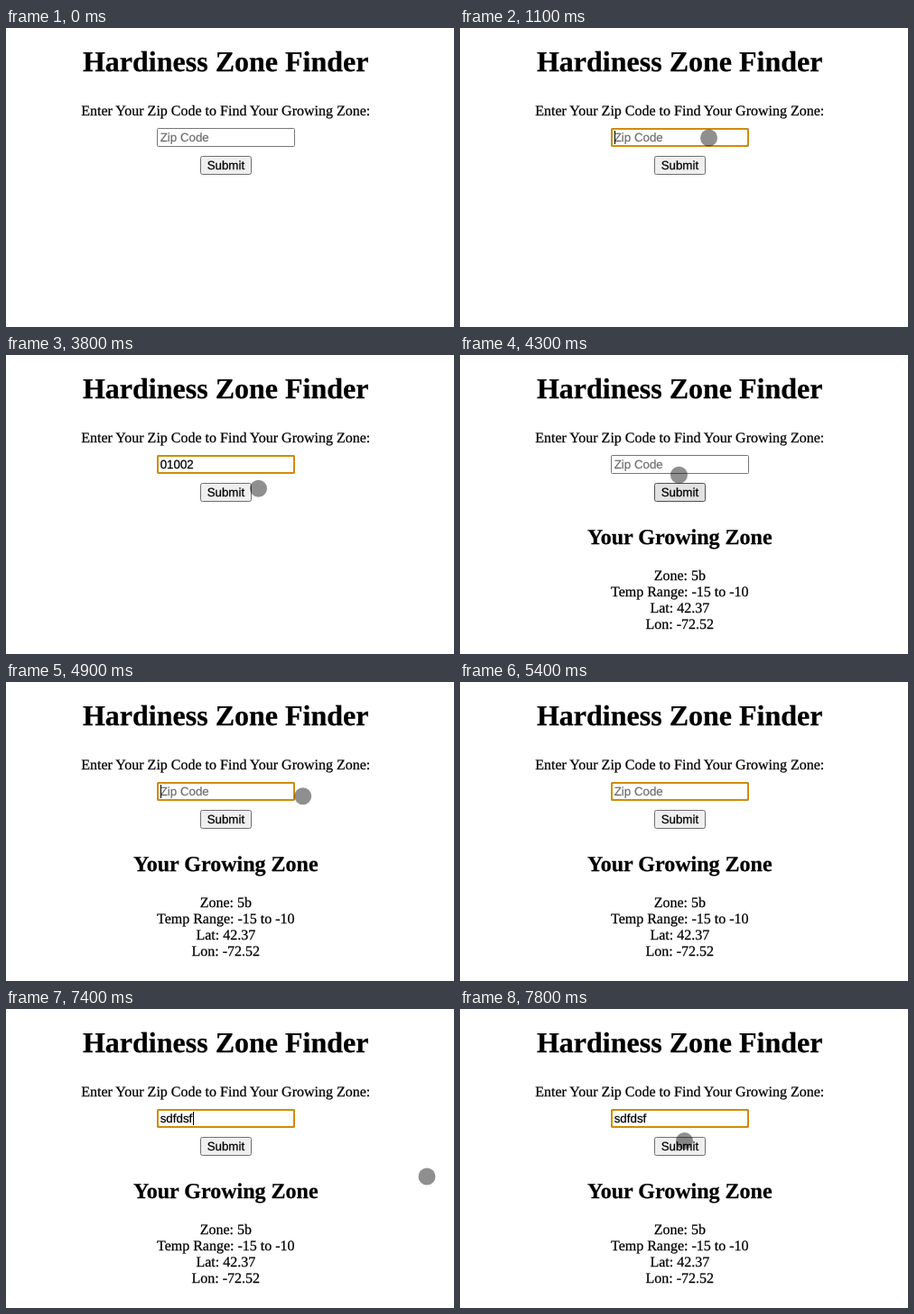
Write an HTML page that moves like this. It is 496 by 332 pixels and loops after 8000 ms.

```html
<!DOCTYPE html>
<html lang="en">
<head>
<meta charset="utf-8">
<title>Hardiness Zone Finder</title>
<style>
  html, body { margin: 0; width: 100%; height: 100%; overflow: hidden; background: #fff; }
  svg { display: block; width: 496px; height: 332px; }
  text { fill: var(--ink, #000); stroke: var(--ink, #000); stroke-width: .25px; text-rendering: geometricPrecision; }
  .serif { font: 16px "Liberation Serif", "Times New Roman", serif; text-anchor: middle; }
  .serif .title { font-size: 32px; font-weight: bold; }
  .serif .heading { font-size: 24px; font-weight: bold; }
  .control { font: 13.333px "Liberation Sans", Arial, sans-serif; }
  #field { fill: #fff; stroke: #767676; }
  #ring { fill: none; stroke: #d18c05; stroke-width: 2; }
  #value.empty { --ink: #717171; }
  #button { fill: #efefef; stroke: #6f6f6f; }
  #button.hover { fill: #e2e2e2; stroke: #4f4f4f; }
  #pointer { fill: #000; fill-opacity: .44; }
</style>
</head>
<body>
<svg viewBox="0 0 496 332">
  <g class="serif">
    <text class="title" x="243.2" y="48">Hardiness Zone Finder</text>
    <text x="243.3" y="97">Enter Your Zip Code to Find Your Growing Zone:</text>
    <g id="result">
      <text class="heading" x="243.3" y="210">Your Growing Zone</text>
      <text x="243.3" y="250">Zone: 5b</text>
      <text x="243.3" y="268">Temp Range: -15 to -10</text>
      <text x="243.3" y="286">Lat: 42.37</text>
      <text x="243.3" y="304">Lon: -72.52</text>
    </g>
  </g>
  <g class="control">
    <rect id="field" x="167.5" y="111.5" width="152" height="20" rx="1"/>
    <rect id="ring" x="168" y="112" width="151" height="19" rx="2"/>
    <text id="value" x="170.7" y="126"></text>
    <rect id="caret" y="114" width="1" height="15"/>
    <rect id="button" x="215.5" y="142.5" width="56" height="20" rx="2"/>
    <text x="243.4" y="157" text-anchor="middle">Submit</text>
  </g>
  <circle id="pointer" r="9.5"/>
</svg>
<script>
const LOOP = 8000, STEP = 100, BLINK = 500;
const FOCUS = 1000, BLUR = 4100, ANSWER = 4200, REFOCUS = 4800;
const $ = id => document.getElementById(id);
const [ring, value, caret, button, result, pointer] =
  ["ring", "value", "caret", "button", "result", "pointer"].map($);

// Keys arrive in space-separated bursts at a steady pace.
const entries = [
  { start: 1900, end: ANSWER, pace: 275, bursts: "0 1 0 0 2".split(" ") },
  { start: 6900, end: LOOP, pace: 200, bursts: "sdf ds f".split(" ") }
];

// The pointer glides along Bezier curves and rests until hidden.
const glides = [
  { start: 500, end: 1100, hide: 1900, curve: [[290, 129], [275.5, 122]] },
  { start: 3500, end: 4500, hide: 4700, curve: [[275.5, 122], [309, 170], [223, 150], [244, 114]] },
  { start: 4700, end: 5400, hide: 5400, curve: [[244, 114], [403, 148], [487, 100]] },
  { start: 7400, end: 7800, hide: LOOP, curve: [[466, 186], [248.5, 146.5]] }
];

const within = (t, from, to) => t >= from && t < to;
const show = (node, on) => node.setAttribute("visibility", on ? "visible" : "hidden");
const mix = (a, b, u) => a.map((v, i) => v + (b[i] - v) * u);

function bezier(points, u) {
  if (points.length === 1) return points[0];
  return bezier(points.slice(1).map((p, i) => mix(points[i], p, u)), u);
}

function typedAt(t) {
  const entry = entries.find(e => within(t, e.start, e.end));
  if (!entry) return { text: "", lastKey: 0 };
  const { start, pace, bursts } = entry;
  const count = Math.min(Math.floor((t - start) / pace), bursts.length - 1);
  return { text: bursts.slice(0, count + 1).join(""), lastKey: start + count * pace };
}

function drawField(t) {
  const { text, lastKey } = typedAt(t);
  const focused = within(t, FOCUS, BLUR) || t >= REFOCUS;
  value.textContent = text || "Zip Code";
  value.classList.toggle("empty", !text);
  show(ring, focused);

  const blinkAge = t - Math.max(lastKey, t >= REFOCUS ? REFOCUS : FOCUS);
  show(caret, focused && Math.floor(blinkAge / BLINK) % 2 === 0);
  caret.setAttribute("x", Math.round(171 + (text ? value.getComputedTextLength() : 0)));
}

function drawPointer(t) {
  const glide = glides.find(g => within(t, g.start, g.hide));
  show(pointer, glide);
  if (!glide) return;
  const { start, end, curve } = glide;
  const [x, y] = bezier(curve, Math.min((t - start) / (end - start), 1));
  pointer.setAttribute("cx", x);
  pointer.setAttribute("cy", y);
}

function draw(t) {
  drawField(t);
  drawPointer(t);
  button.classList.toggle("hover", within(t, BLUR, 4700));
  show(result, t >= ANSWER);
}

const start = performance.now();
function tick() {
  const t = (performance.now() - start) % LOOP;
  draw(Math.floor(t / STEP) * STEP);
  requestAnimationFrame(tick);
}
tick();
</script>
</body>
</html>
```
